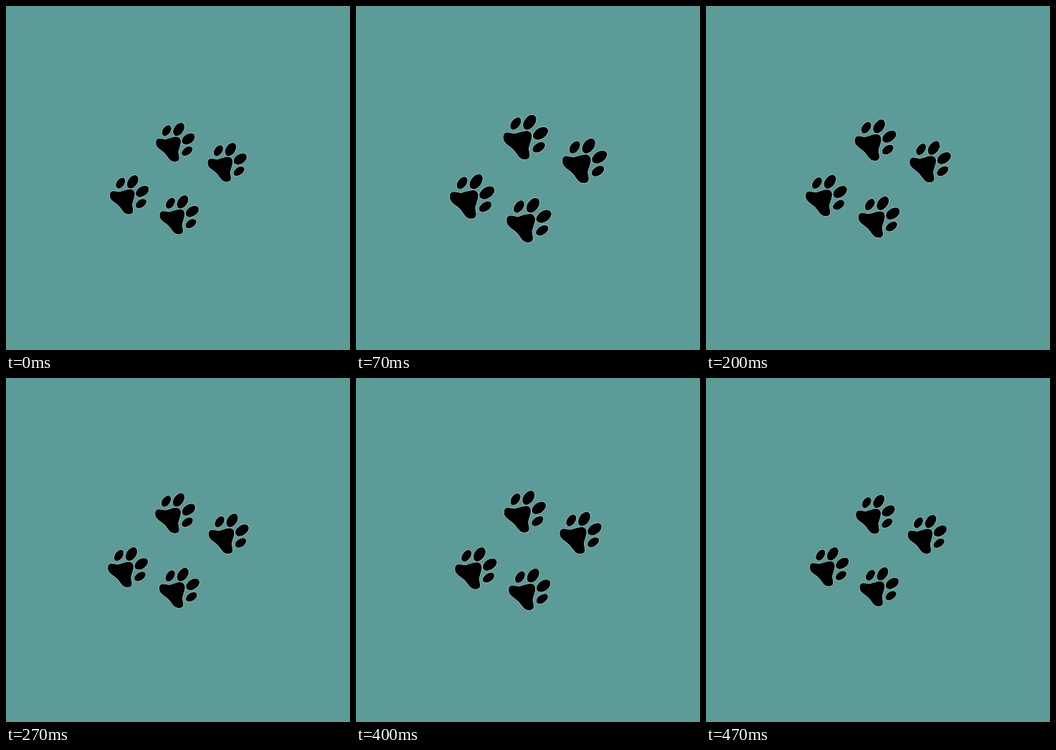
An HTML page for the animation above (1.94 s loop, 480 by 480 pixels).

```html
<!DOCTYPE html>
<html lang="en">
<head>
<meta charset="utf-8">
<title>Paw prints</title>
<style>
  html, body { margin: 0; width: 100%; height: 100%; overflow: hidden; background: #5d9b98; }
  svg { display: block; width: 100%; height: 100%; }
  .paw * { fill: #000; stroke: #fff; stroke-opacity: .7; stroke-width: 1; paint-order: stroke; }
</style>
</head>
<body>
<svg viewBox="0 0 480 480">
  <g transform="translate(239.8 240.7)"><g id="prints"></g></g>
</svg>
<script>
const LOOP = 1940;
const FPS = 15;
const STEPS = 7;
const PAWS = [[-3.3, -50.6], [69, -22.6], [-67.6, 22.6], [2, 50.6]];

// Half of the pad as Bezier points; a paw is symmetric about the line y = -x
const HALF = [
  [5.7, -5.7], [1.7, -9.7], [-5.5, -6], [-13, -4],
  [-17, -3.2], [-27.3, -9.5], [-27.3, 1],
  [-27.3, 8], [-20.5, 9.9], [-15.2, 15.2]
];
const mirror = ([x, y]) => [-y, -x];

function padPath() {
  const [start, ...rest] = [...HALF, ...HALF.map(mirror).reverse().slice(1)];
  return `<path d="M${start}C${rest.join(" ")}Z"/>`;
}

function toePair(x, y, rx, ry, tilt) {
  const toe = ([cx, cy], angle) =>
    `<ellipse rx="${rx}" ry="${ry}" transform="translate(${cx} ${cy}) rotate(${angle})"/>`;
  return toe([x, y], tilt) + toe(mirror([x, y]), 90 - tilt);
}

const paw = padPath() + toePair(-12.4, -16.2, 5.3, 8.5, 35) + toePair(4.6, -18, 6.6, 10.2, 35);
const prints = document.getElementById("prints");
prints.innerHTML = PAWS.map(([x, y]) =>
  `<g class="paw" transform="translate(${x} ${y})">${paw}</g>`).join("");

// A strong beat leaning right, then one half as strong leaning left
function pose(step) {
  const wave = Math.sin(2 * Math.PI * step / STEPS);
  const grow = (wave > 0 ? 0.21 : 0.105) * Math.abs(wave) ** 1.5;
  return `rotate(${5 * Math.sign(wave) * grow}) scale(${1 + grow})`;
}

// Step changes fall on whole hundredths of a second
const stepTime = step => Math.round(step * 100 / FPS) * 10;

function draw(now) {
  const time = now % LOOP;
  let step = 0;
  while (step < STEPS && stepTime(step + 1) <= time) step++;
  prints.setAttribute("transform", pose(step));
}

const begin = performance.now();
function tick() {
  draw(performance.now() - begin);
  requestAnimationFrame(tick);
}
tick();
</script>
</body>
</html>
```
